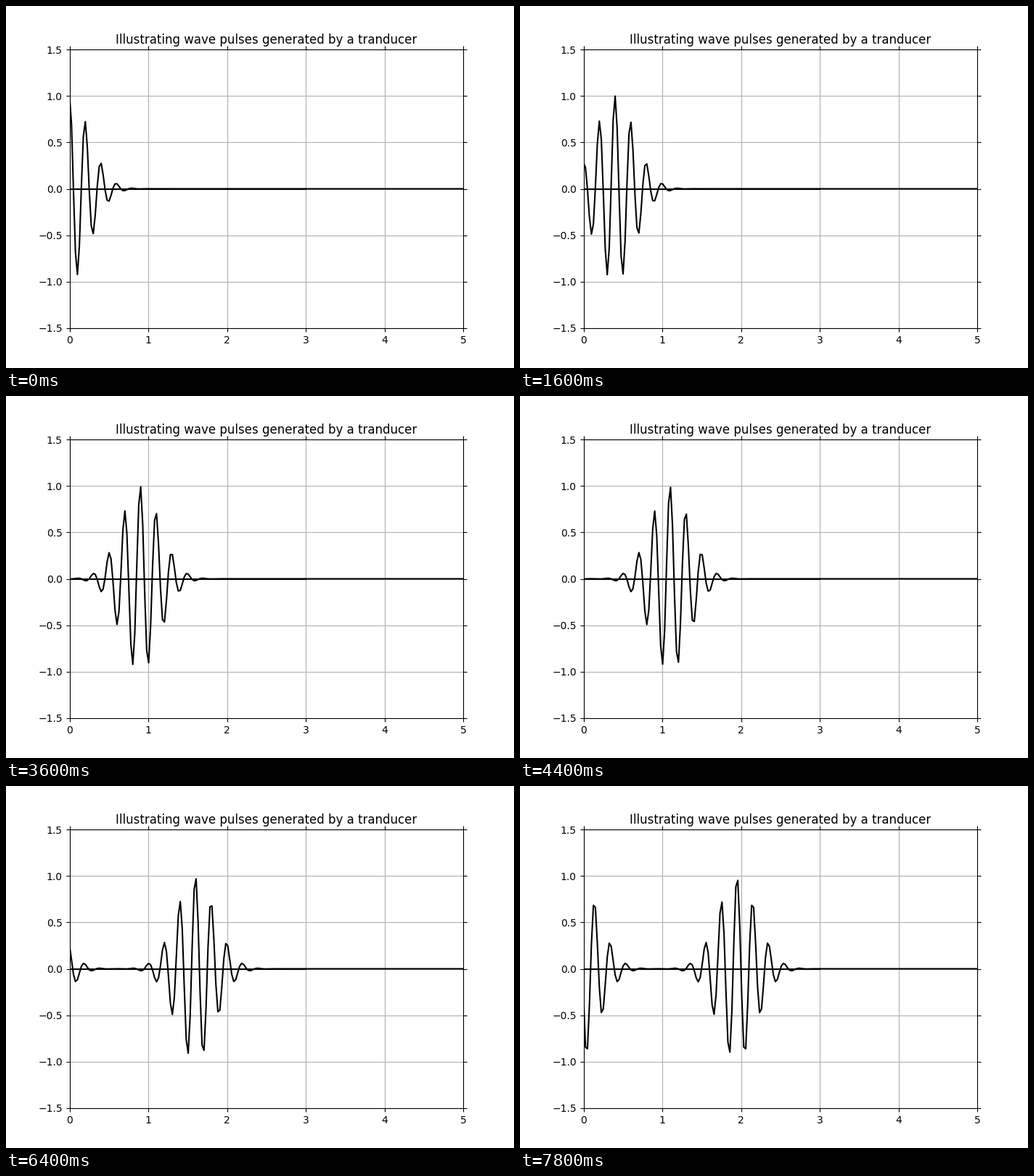
These frames come from a looping animation (700 by 500 pixels, 8000 ms). A matplotlib script:

```python
import numpy as np
import matplotlib.pyplot as plt
from matplotlib.animation import FuncAnimation

FRAMES = 40
INTERVAL = 200      # ms
STEP = 0.05         # distance travelled per frame
SPACING = 2.01      # distance between successive pulses
FREQ = 5            # carrier cycles per unit length
DECAY = 8           # sharpness of the Gaussian envelope

x = np.linspace(0, 5, 200)


def pulse(center):
    d = x - center
    return np.exp(-DECAY * d**2) * np.cos(2 * np.pi * FREQ * d)


def wave(i):
    lead = STEP * i
    return pulse(lead) + pulse(lead - SPACING)


fig, ax = plt.subplots(figsize=(7, 5), dpi=100)
ax.set_xlim(0, 5)
ax.set_ylim(-1.5, 1.5)
ax.grid(True)
ax.tick_params(which="both", top=True, right=True)
ax.set_title("Illustrating wave pulses generated by a tranducer", y=1.0, pad=6)

ax.plot([0, 3], [0, 0], color="black", lw=1.5)
line, = ax.plot(x, wave(0), color="black", lw=1.5)


def init():
    line.set_ydata(wave(0))
    return line,


def update(i):
    line.set_ydata(wave(i))
    return line,


anim = FuncAnimation(fig, update, frames=FRAMES, init_func=init,
                     interval=INTERVAL, repeat=True, repeat_delay=0)
plt.show()
```
